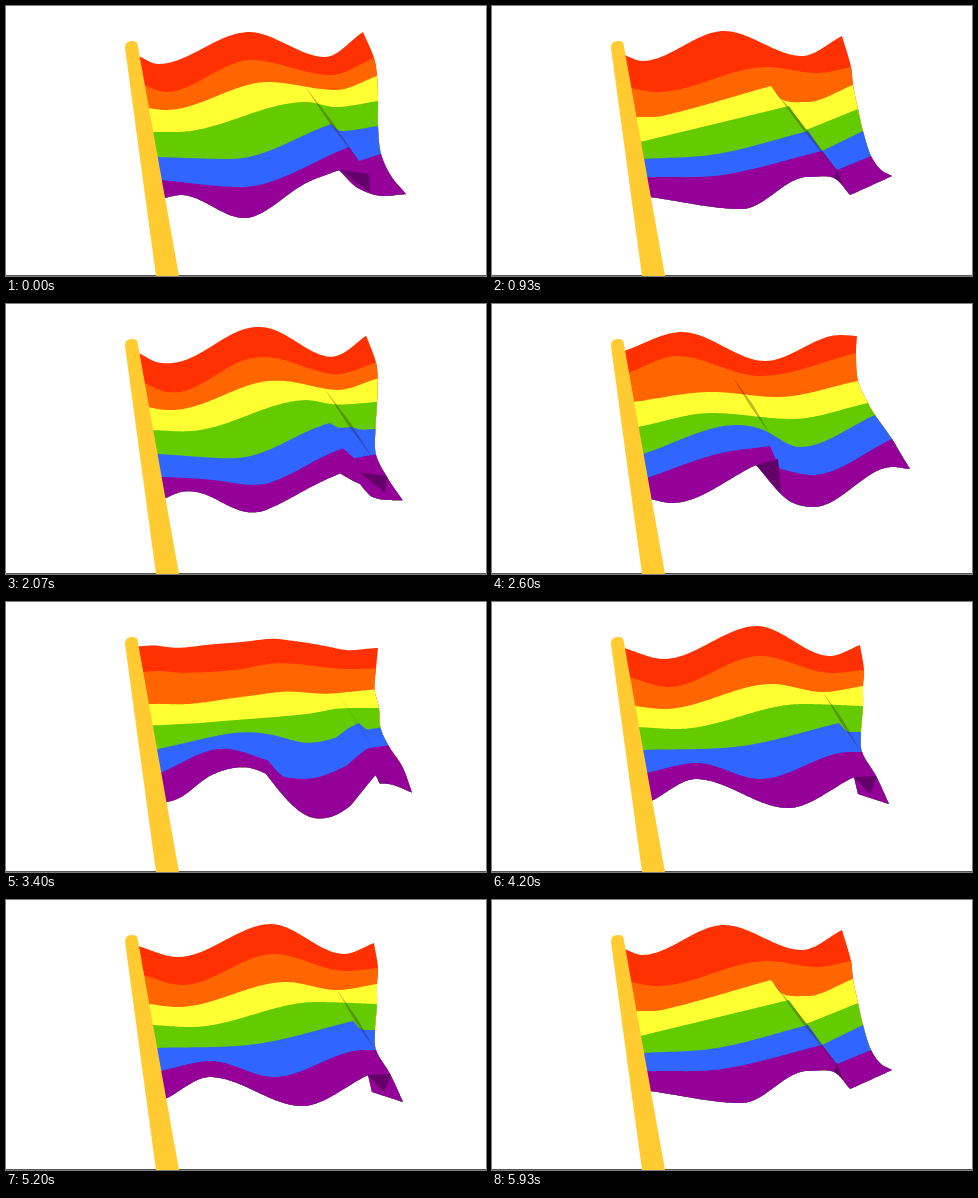
An HTML page with a canvas that plays this animation: 480x270 px, repeating every 5.99 s.

```html
<!DOCTYPE html>
<html lang="en">
<head>
<meta charset="utf-8">
<title>Waving flag</title>
<style>
html, body { margin: 0; width: 100%; height: 100%; overflow: hidden; background: #fff; }
canvas { display: block; width: 100vw; height: 100vh; }
</style>
</head>
<body>
<canvas id="stage" width="480" height="270"></canvas>
<script>
const ctx = document.getElementById('stage').getContext('2d');
const COLORS = ['#ff3100', '#ff6500', '#ffff31', '#64cb00', '#3165ff', '#940098'];
const LOOP = 5990, DRAWINGS = 13, SAMPLES = 140;

const gap = (a, b) => Math.hypot(b[0] - a[0], b[1] - a[1]) || 1e-6;
const dir = (a, b) => [(b[0] - a[0]) / gap(a, b), (b[1] - a[1]) / gap(a, b)];

function pairs(a) {
  const out = [];
  for (let i = 0; i < a.length; i += 2) out.push([a[i], a[i + 1]]);
  return out;
}

// Direction at point i: level at crests and troughs, one-sided at sharp corners.
function slope(p, i, seg) {
  const a = p[i - 1], b = p[i], c = p[i + 1], own = dir(p[seg], p[seg + 1]);
  if (!a || !c) return own;
  const u = dir(a, b), v = dir(b, c);
  if (u[0] * v[0] + u[1] * v[1] < .6) return own;
  if (u[1] * v[1] <= 0) return [own[0], 0];
  const d = gap(a, b) + gap(b, c);
  return [(c[0] - a[0]) / d, (c[1] - a[1]) / d];
}

function smooth(p, n) {
  const out = [p[0]];
  for (let i = 0; i < p.length - 1; i++) {
    const d = gap(p[i], p[i + 1]), m = slope(p, i, i), k = slope(p, i + 1, i);
    for (let j = 1; j <= n; j++) {
      const t = j / n, s = 1 - t;
      out.push([0, 1].map(c =>
        s * s * (1 + 2 * t) * p[i][c] + t * t * (3 - 2 * t) * p[i + 1][c] +
        d * (t * s * s * m[c] - t * t * s * k[c])));
    }
  }
  return out;
}

// Even spacing along the curve, so poses can be blended point by point.
function resample(p) {
  const len = [0];
  for (let i = 1; i < p.length; i++) len.push(len[i - 1] + gap(p[i - 1], p[i]));
  const out = [];
  for (let j = 0, i = 1; j < SAMPLES; j++) {
    const s = len[len.length - 1] * j / (SAMPLES - 1);
    while (i < p.length - 1 && len[i] < s) i++;
    const t = (s - len[i - 1]) / (len[i] - len[i - 1]);
    out.push([0, 1].map(c => p[i - 1][c] + (p[i][c] - p[i - 1][c]) * t));
  }
  return out;
}

const poleX = y => 130 + .18 * (y - 36);

// A seam starts at the pole at height y, then passes its crests, troughs and corners.
const seam = (y, ...rest) => resample(smooth([[poleX(y), y], ...pairs(rest)], 20));

// fold: point on the free edge, crease from and to, underside triangle
const pose = (at, fold, ...seams) => ({ at, fold: pairs(fold), seams });

const crest = pose(0,
  [385, 170, 298, 79, 353, 156, 334, 164, 363, 168, 364, 187],
  seam(50, 152, 58, 243, 26, 319, 51, 357, 26),
  seam(79, 160, 86, 245, 54, 325, 69, 368, 52),
  seam(102, 160, 104, 262, 76, 330, 84, 371, 70),
  seam(126, 170, 126, 300, 96, 330, 101, 372, 95),
  seam(151, 225, 153, 325, 118, 335, 125, 372, 120),
  seam(174, 235, 181, 343, 141, 353, 155, 375, 148),
  seam(192, 175, 189, 238, 212, 300, 177, 333, 164, 352, 182, 378, 190, 400, 188));

const late = pose(3,
  [384, 174, 331, 90, 369, 150, 362, 175, 385, 174, 378, 192],
  seam(46, 172, 57, 265, 24, 338, 54, 368, 43),
  seam(75, 176, 85, 268, 54, 340, 71, 372, 68),
  seam(104, 172, 107, 280, 82, 331, 90, 371, 84),
  seam(125, 185, 127, 310, 102, 371, 104),
  seam(148, 250, 144, 347, 121, 357, 130, 369, 130),
  seam(171, 205, 161, 268, 177, 358, 150, 370, 150),
  seam(199, 204, 177, 296, 206, 362, 175, 366, 192, 397, 202));

const fresh = pose(8,
  [410, 152, 240, 72, 278, 130, 264, 161, 286, 155, 289, 189],
  seam(47, 190, 28, 273, 57, 348, 31, 365, 32),
  seam(69, 185, 52, 268, 72, 364, 49),
  seam(98, 220, 88, 285, 93, 366, 77),
  seam(123, 220, 109, 300, 115, 376, 99),
  seam(150, 245, 121, 269, 125, 308, 143, 383, 111),
  seam(174, 225, 150, 278, 142, 288, 165, 320, 171, 400, 135),
  seam(195, 180, 199, 264, 161, 296, 196, 322, 203, 400, 163, 418, 165));

const early = pose(12,
  [389, 164, 279, 80, 347, 168, 342, 172, 345, 163, 353, 187],
  seam(49, 150, 55, 232, 25, 310, 50, 350, 30),
  seam(82, 165, 86, 275, 61, 325, 67, 359, 61),
  seam(111, 170, 110, 279, 80, 291, 94, 315, 96, 361, 79),
  seam(136, 297, 100, 314, 124, 366, 103),
  seam(153, 225, 148, 316, 125, 330, 145, 371, 125),
  seam(171, 230, 169, 330, 145, 345, 164, 379, 150),
  seam(191, 250, 203, 315, 171, 342, 172, 358, 189, 400, 170));

// Three poses carry a travelling wave; the fourth corrects it near its own time.
const base = [crest, late, fresh];
const half = d => Math.sin(Math.PI * d / DRAWINGS);
const waveWeights = p => base.map((a, i) => base.reduce((w, b, j) =>
  i === j ? w : w * half(p - b.at) / half(a.at - b.at), 1));

function weights(p) {
  const w = waveWeights(p), e = waveWeights(early.at);
  const bump = p <= fresh.at ? 0 : p <= early.at
    ? (p - fresh.at) / (early.at - fresh.at) : DRAWINGS - p;
  return [...w.map((v, i) => v - bump * e[i]), bump];
}

function mix(w, pick) {
  const sets = [...base, early].map(pick);
  return sets[0].map((_, i) => [0, 1].map(c => sets.reduce((s, q, k) => s + w[k] * q[i][c], 0)));
}

function trace(p) {
  ctx.beginPath();
  p.forEach(q => ctx.lineTo(q[0], q[1]));
  ctx.closePath();
}

function fill(p, color) {
  trace(p);
  ctx.fillStyle = color;
  ctx.fill();
}

// The crease runs off the free edge and a new one forms, so it fades in between.
function drawFold(p, w) {
  const mid = (late.at + fresh.at) / 2;
  const between = p > late.at && p < fresh.at;
  const foldW = between ? weights(p < mid ? late.at : fresh.at) : w;
  const [, top, end, ...under] = mix(foldW, k => k.fold);
  const x = (top[0] + end[0]) / 2, y = (top[1] + end[1]) / 2;
  const alpha = between ? Math.abs(p - mid) / (fresh.at - mid) : 1;
  ctx.globalAlpha = alpha;
  fill(under, '#63006a');
  ctx.globalAlpha = alpha * .3;
  fill([top, [x + 1.5, y - 1], end, [x - 1, y + 1]], '#301800');
  ctx.globalAlpha = 1;
}

function drawFlag(p) {
  const w = weights(p), step = 10;
  const seams = crest.seams.map((_, i) => mix(w, k => k.seams[i]));
  const ends = seams.map(s => s[s.length - 1]);
  const edge = smooth([...ends.slice(0, 6), mix(w, k => k.fold)[0], ends[6]], step);
  const bottom = seams[6].slice().reverse();
  const below = i => [...seams[i], ...edge.slice(i * step), ...bottom];
  COLORS.forEach((color, i) => fill(below(i), color));
  ctx.save();
  trace(below(0));
  ctx.clip();
  drawFold(p, w);
  ctx.restore();
}

function drawPole() {
  ctx.beginPath();
  ctx.moveTo(150, 270);
  ctx.lineTo(119, 42);
  ctx.quadraticCurveTo(118.5, 36, 125, 35);
  ctx.quadraticCurveTo(131, 34.5, 131.5, 38);
  ctx.lineTo(173, 270);
  ctx.closePath();
  ctx.fillStyle = '#ffcb31';
  ctx.fill();
}

// Fifteen ticks a second, thirteen drawings: two of them are held.
function drawingAt(ms) {
  let tick = Math.floor(ms * 3 / 200 + .1);
  if (ms < Math.round(tick * 20 / 3) * 10) tick--;
  const k = tick % 15;
  return k - (k >= 5) - (k >= 12);
}

function frame(now) {
  ctx.fillStyle = '#fff';
  ctx.fillRect(0, 0, 480, 270);
  ctx.fillStyle = '#555';
  ctx.fillRect(0, 269, 480, 1);
  drawFlag(drawingAt((now - start) % LOOP));
  drawPole();
  requestAnimationFrame(() => frame(performance.now()));
}

const start = performance.now();
frame(start);
</script>
</body>
</html>
```
